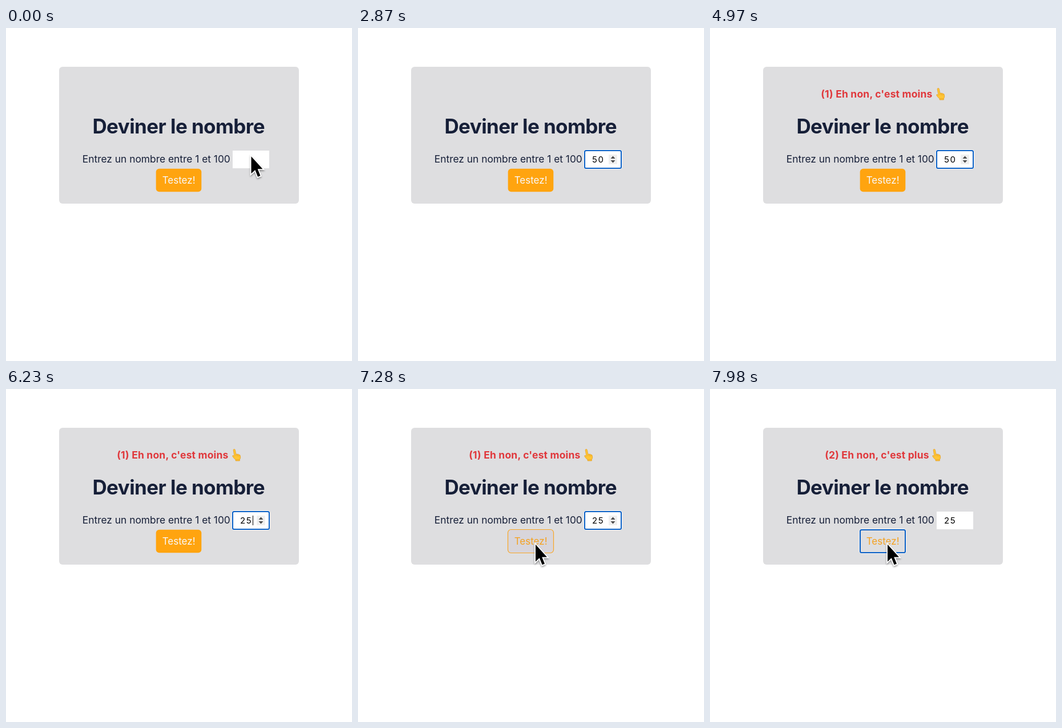
An HTML page that plays this animation: 606x584 px, repeating every 8000 ms.

```html
<!DOCTYPE html>
<html lang="fr">
<head>
<meta charset="utf-8">
<title>Deviner le nombre</title>
<style>
  html, body { margin: 0; width: 100%; height: 100%; overflow: hidden; background: #fff; }
  svg { display: block; width: 606px; height: 584px; font-family: Inter, Roboto, sans-serif; }
  .title { font-size: 35px; font-weight: 700; letter-spacing: -.57px; text-anchor: middle; }
  .label { font-size: 17.37px; }
  .action { font-size: 17px; }
  .message { font-size: 17.5px; font-weight: 700; letter-spacing: .17px; fill: #e0383c; }
  .value { font-size: 15px; letter-spacing: 1.6px; fill: #000; }
  .ring rect { fill: none; }
  .ring .halo { stroke: #fff; stroke-opacity: .75; }
  .ring .line { stroke: #0a60c6; stroke-width: 2; }
</style>
</head>
<body>
<svg viewBox="0 0 606 584" fill="#161f38">
  <defs>
    <filter id="shadow" x="-50%" y="-50%" width="200%" height="200%">
      <feDropShadow dx="0" dy="2" stdDeviation="1.6" flood-color="#000" flood-opacity=".4"/>
    </filter>
    <path id="beamShape" fill="none" d="M-7.5-17Q-1-17 0-12Q1-17 7.5-17M0-13V13M-7.5 16.5Q-1 16.5 0 11.5Q1 16.5 7.5 16.5M-3.5 0H3.5"/>
  </defs>

  <rect x="93" y="68" width="420" height="240" rx="6" fill="#dedee0"/>

  <g id="message">
    <text id="messageText" class="message" x="194" y="122"></text>
    <g id="hand" stroke="#e39a20" stroke-width=".7" stroke-linejoin="round">
      <path fill="#ffc636" d="M2.600 1.500Q2.800 0 4.200 0Q5.700 0 6 1.800L7.400 9Q8.800 7.800 10 9Q11.500 8.200 12.400 9.800Q14.600 9.400 14.800 11.500L15.200 14.500Q15 17 13.800 18.200V20.500H6.600V18.500Q3 16 1.200 12.300Q1.200 10.800 2.600 11L4.600 12.500Z"/>
      <path fill="none" d="M7.400 9V12M10 9V12.500M12.400 10V13M6.600 18.500H13.800"/>
    </g>
  </g>

  <text class="title" x="302.200" y="184.500">Deviner le nombre</text>
  <text class="label" x="133.800" y="236">Entrez un nombre entre 1 et 100</text>

  <rect x="397" y="215" width="64" height="31" fill="#fff"/>
  <g id="inputRing" class="ring">
    <rect class="halo" x="395.500" y="213.500" width="67" height="34" rx="4"/>
    <rect class="line" x="397" y="215" width="64" height="31" rx="2.500"/>
  </g>
  <g id="spinner">
    <rect x="439" y="222" width="15" height="17" fill="#efefef"/>
    <path fill="#4c4c4c" d="M442.500 229L446.500 224.500L450.500 229ZM442.500 232L446.500 236.500L450.500 232Z"/>
  </g>
  <text id="value" class="value" y="236"></text>
  <rect id="caret" y="222" width="1" height="17" fill="#000"/>

  <rect id="button" x="262.700" y="246.800" width="79.600" height="40.400" rx="5.500"/>
  <rect id="border" x="262.500" y="246.500" width="80" height="41" rx="5.500" fill="none" stroke="#f9a624" stroke-width="1.200"/>
  <text id="buttonText" class="action" x="273.700" y="273">Testez!</text>
  <g id="buttonRing" class="ring">
    <rect class="halo" x="261.500" y="245.500" width="82" height="43" rx="4"/>
    <rect class="line" x="263" y="247" width="79" height="40" rx="2.500"/>
  </g>

  <g id="beam" transform="translate(427 238)" filter="url(#shadow)">
    <use href="#beamShape" stroke="#fff" stroke-width="5"/>
    <use href="#beamShape" stroke="#000" stroke-width="2.400"/>
  </g>
  <path id="arrow" filter="url(#shadow)" fill="#000" stroke="#fff" stroke-width="3.500" paint-order="stroke"
    d="M0 0V30L6.800 23.600L11.600 35.600L16 33.800L11.200 22H20Z"/>
</svg>
<script>
const LOOP = 8000, TICK = 70;
const el = id => document.getElementById(id);
const parts = Object.fromEntries(
  ['message', 'messageText', 'hand', 'inputRing', 'spinner', 'value', 'caret',
   'button', 'border', 'buttonText', 'buttonRing', 'beam', 'arrow'].map(id => [id, el(id)]));

// Each track lists [start time, state]; the last started state holds.
const at = (track, t) => track.findLast(([start]) => start <= t)[1];
const tracks = {
  value: [[0, ''], [1960, '5'], [2310, '50'], [5110, '5'], [5250, ''], [6020, '2'], [6230, '25']],
  caret: [[0, 0], [770, 1], [1330, 0], [1820, 1], [2870, 0], [3360, 1], [3920, 0],
          [4410, 1], [4970, 0], [5460, 1], [6720, 0]],
  cursor: [[0, 'arrow'], [490, 'beam'], [1960, ''], [6720, 'beam'], [6790, 'arrow']],
  message: [[0, null], [3360, ["(1) Eh non, c'est moins", 194.3, 395.5]],
            [7700, ["(2) Eh non, c'est plus", 201.3, 388.5]]]
};
const path = [[6720, 429.5, 225.3], [6790, 412, 230], [6860, 370, 238], [6930, 332, 246.7],
              [7000, 319, 258], [7070, 312, 268], [7140, 311, 272.7]];

const progress = (t, from, to) => Math.min(1, Math.max(0, (t - from) / (to - from)));
const mix = (a, b, p) => `rgb(${a.map((v, i) => Math.round(v + (b[i] - v) * p))})`;
const show = (node, on) => { node.style.display = on ? '' : 'none'; };

function pointer(t) {
  const next = path.findIndex(([time]) => time > t);
  if (next === 0) return path[0].slice(1);
  if (next < 0) return path.at(-1).slice(1);
  const [t0, x0, y0] = path[next - 1], [t1, x1, y1] = path[next];
  const p = progress(t, t0, t1);
  return [x0 + (x1 - x0) * p, y0 + (y1 - y0) * p];
}

function draw(t) {
  const value = at(tracks.value, t);
  const width = value.length * 11;
  parts.value.textContent = value;
  parts.value.setAttribute('x', 421 - width / 2);
  parts.caret.setAttribute('x', Math.floor(421 + width / 2));
  show(parts.caret, at(tracks.caret, t));

  const clicked = t >= 7560;
  show(parts.inputRing, t >= 770 && !clicked);
  show(parts.spinner, t >= 490 && !clicked);
  show(parts.buttonRing, clicked);

  const message = at(tracks.message, t);
  show(parts.message, message);
  if (message) {
    parts.messageText.textContent = message[0];
    parts.messageText.setAttribute('x', message[1]);
    parts.hand.setAttribute('transform', `translate(${message[2]} 105.5)`);
  }

  const hover = progress(t, 6970, 7210);
  parts.button.setAttribute('fill', clicked ? '#dedee0' : mix([255, 164, 15], [216, 213, 219], hover));
  parts.buttonText.setAttribute('fill', mix([248, 248, 250], [244, 162, 34], hover));
  parts.border.style.opacity = clicked ? 0 : hover;

  const cursor = at(tracks.cursor, t);
  show(parts.beam, cursor === 'beam');
  show(parts.arrow, cursor === 'arrow');
  parts.arrow.setAttribute('transform', `translate(${pointer(t)})`);
}

function frame() {
  const t = performance.now() % LOOP;
  draw(Math.floor(t / TICK) * TICK);
  requestAnimationFrame(frame);
}
frame();
</script>
</body>
</html>
```
